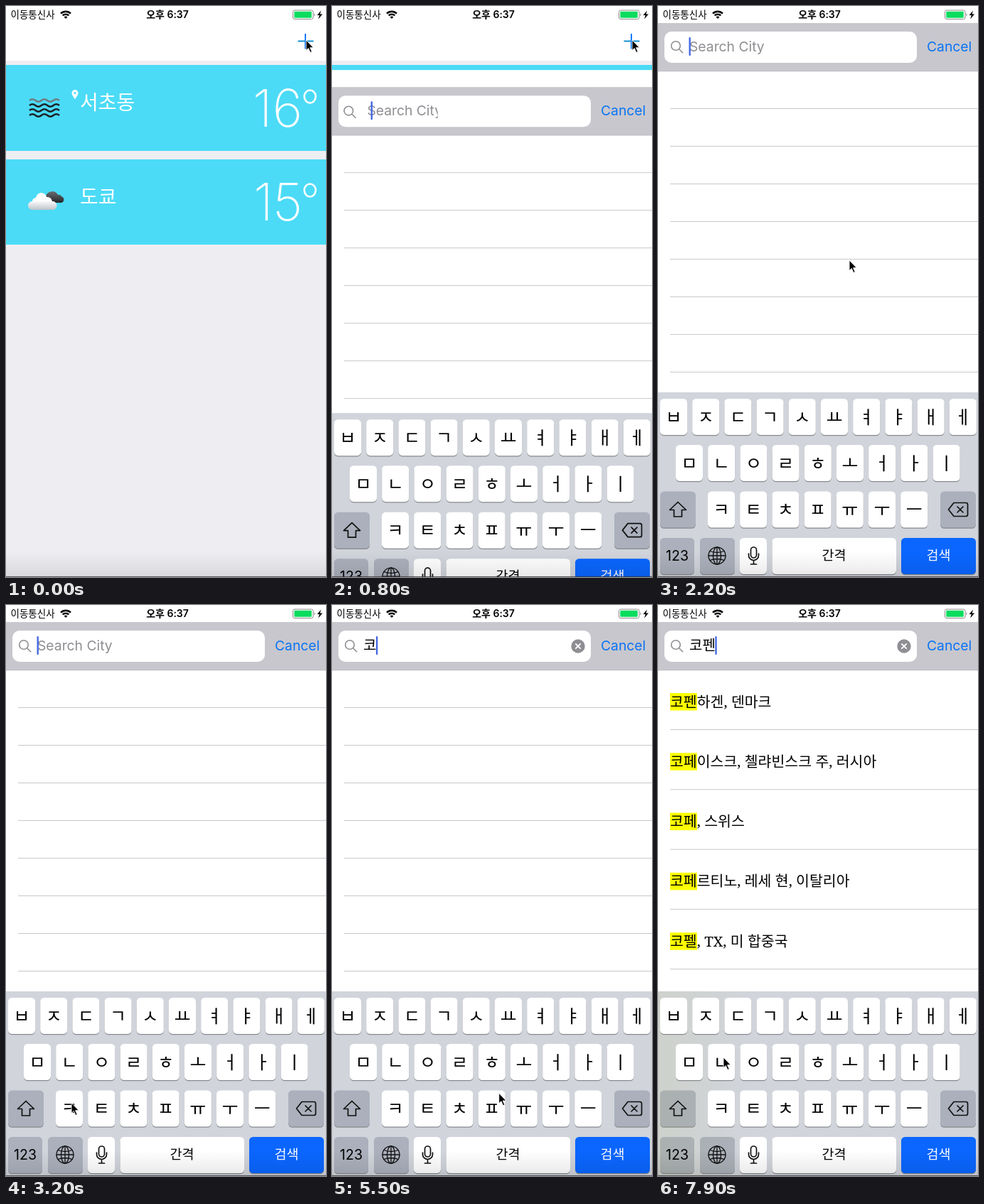
These frames come from a looping animation (450x804 px, 8000 ms). An HTML page:

```html
<!DOCTYPE html>
<html lang="ko">
<head>
<meta charset="utf-8">
<title>City search</title>
<style>
html, body { margin: 0; width: 100%; height: 100%; overflow: hidden; background: #fff; }
svg { display: block; }
#stage { width: 100vw; height: 100vh; }
text { font-family: Inter, "Noto Sans CJK KR", sans-serif; }
.place { font-size: 28px; font-weight: 300; fill: #fff; }
.temp { font-size: 73px; font-weight: 200; fill: #fff; text-anchor: end; }
.row { font: 20.5px "Noto Serif", "Noto Sans CJK KR", serif; }
.field { font-size: 20px; }
.hint { font-size: 19.3px; }
.jamo { font-size: 25px; text-anchor: middle; }
.word { font-size: 18.5px; text-anchor: middle; }
.line { fill: none; stroke: #111; stroke-width: 1.7; stroke-linejoin: round; stroke-linecap: round; }
</style>
</head>
<body>
<svg id="stage" viewBox="0 0 450 804" preserveAspectRatio="none">
  <defs>
    <linearGradient id="whiteCloud" x2="0" y2="1">
      <stop offset=".45" stop-color="#fff"/><stop offset="1" stop-color="#bfc3c9"/>
    </linearGradient>
    <linearGradient id="darkCloud" x2="0" y2="1">
      <stop stop-color="#6a6d71"/><stop offset="1" stop-color="#25272a"/>
    </linearGradient>
    <linearGradient id="tintFade">
      <stop stop-color="#a8b400" stop-opacity=".07"/><stop offset="1" stop-color="#a8b400" stop-opacity="0"/>
    </linearGradient>
    <linearGradient id="footFade" x2="0" y2="1">
      <stop stop-opacity="0"/><stop offset="1" stop-opacity=".09"/>
    </linearGradient>
  </defs>

  <g id="home">
    <rect width="450" height="804" fill="#eeedf2"/>
    <rect width="450" height="77" fill="#fff"/>
    <g id="plus" stroke-width="2">
      <path d="M410.500 49.500h22" stroke="#1390d0"/><path d="M421 39v21.500" stroke="#0a7aff"/>
    </g>
    <path d="M0 83h450v121H0zM0 216h450v120H0z" fill="#4bdbf6"/>
    <g id="fog" fill="none" stroke-width="2.600"></g>
    <path d="M97 131.500c-2-4-4.500-5.500-4.500-9a4.500 4.500 0 0 1 9 0c0 3.500-2.500 5-4.500 9z" fill="#fff"/>
    <circle cx="97" cy="122.500" r="1.600" fill="#4bdbf6"/>
    <path d="M62 277a7 7 0 0 1-6-8a9 9 0 0 1 17-3a4.500 4.500 0 0 1 5 2a4.700 4.700 0 0 1 0 9z" fill="url(#darkCloud)"/>
    <path d="M37 287a6 6 0 0 1 0-12a5 5 0 0 1 5-5a7.600 7.600 0 0 1 15-1a7 7 0 0 1 8 6a6 6 0 0 1 1 12z" fill="url(#whiteCloud)"/>
    <text class="place" x="104" y="145.700">서초동</text>
    <text class="place" x="104" y="278.500">도쿄</text>
    <text class="temp" x="417" y="170">16</text>
    <text class="temp" x="417" y="302">15</text>
    <g fill="none" stroke="#fff" stroke-width="2.600">
      <ellipse cx="427.500" cy="127.500" rx="8" ry="9"/><ellipse cx="427.500" cy="259.500" rx="8" ry="9"/>
    </g>
  </g>

  <g id="modal">
    <rect width="450" height="804" fill="#fff"/>
    <g id="blank"></g>
    <g id="results"></g>
    <rect y="24" width="450" height="68" fill="#c8c7cd"/>
    <rect y="91.500" width="450" height=".7" fill="#b4b3b9"/>
    <rect x="9" y="36" width="355" height="44" rx="10" fill="#fff"/>
    <g id="lens" fill="none" stroke="#8e8e93" stroke-width="1.600">
      <circle cx="25" cy="56" r="6.300"/><path d="M29.700 60.700l5.500 5.500"/>
    </g>
    <svg id="hintBox" y="38" height="36"><text class="hint" y="26" fill="#8e8e93">Search City</text></svg>
    <text id="query" class="field" x="44" y="64"></text>
    <g id="clear">
      <circle cx="346" cy="58" r="9.700" fill="#8e8e93"/>
      <path d="M342.300 54.300l7.400 7.400m0-7.400l-7.400 7.400" stroke="#fff" stroke-width="1.900"/>
    </g>
    <rect id="caret" y="44" width="2.400" height="26" rx="1" fill="#4369e3"/>
    <text class="hint" x="378" y="64" fill="#0a74f5">Cancel</text>
  </g>

  <g id="keyboard">
    <rect y="544" width="450" height="264" fill="#d1d4db"/>
    <g id="grayKeys"></g>
    <rect id="tint" y="544" width="135" height="260" fill="url(#tintFade)"/>
    <g id="keys"></g>
    <path class="line" d="M28 698.500l11.500 11h-6v9.500h-11v-9.500h-6z"/>
    <path class="line" d="M408.500 709l7.500-9.500h17a2.500 2.500 0 0 1 2.500 2.500v14a2.500 2.500 0 0 1-2.500 2.500h-17zM421 705l8 8m0-8l-8 8"/>
    <g class="line" style="stroke-width:1.300">
      <circle cx="83" cy="774" r="12"/><ellipse cx="83" cy="774" rx="5.500" ry="12"/>
      <path d="M71 774h24M83 762v24M73 767.500q10 4 20 0M73 780.500q10-4 20 0"/>
    </g>
    <rect class="line" x="130.500" y="762" width="8" height="15" rx="4"/>
    <path class="line" d="M127.500 771v2.500a7 7 0 0 0 14 0v-2.500M134.500 780.500v5.500M130.500 786h8"/>
    <text x="27" y="781" font-size="19.500" text-anchor="middle">123</text>
    <text class="word" x="247.500" y="780">간격</text>
    <text class="word" x="394.500" y="780" fill="#fff">검색</text>
  </g>

  <rect y="768" width="450" height="36" fill="url(#footFade)"/>
  <rect y="803" width="450" height="1" fill="#333" opacity=".75"/>

  <g id="status">
    <text x="6.500" y="17" font-size="13.500">이동통신사</text>
    <g id="wifi" fill="none" stroke="#000" stroke-width="2.500"></g>
    <text x="227" y="17" font-size="14" font-weight="600" text-anchor="middle">오후 6:37</text>
    <rect x="403.500" y="6" width="28.500" height="12.500" rx="2.500" fill="#fff" stroke="#8b8b8b"/>
    <rect x="405.300" y="7.800" width="24.500" height="9" rx="1" fill="#0bdc5f"/>
    <path d="M433.500 10q2 2.300 0 4.600z" fill="#777"/>
    <path d="M443 6.500l-5.500 6.500h3.300l-1.700 5.500 6-7h-3.500z"/>
  </g>
  <path id="pointer" d="M0 0v14.500l3.300-3 2.600 6 2.300-1-2.600-5.800h4.700z" stroke="#fff" stroke-width=".9"/>
</svg>

<script>
const $ = id => document.getElementById(id);
const LOOP = 8000, FRAME = 100, SLIDE = 568.8;

// time, x, y of the pointer tip
const path = [
  [0, 422, 48], [1050, 422, 48], [2200, 269, 358], [2350, 269, 358],
  [3200, 92, 701], [3600, 92, 701], [4100, 200, 656], [4700, 268, 637],
  [5050, 268, 637], [5700, 225, 702], [6100, 225, 702], [6500, 417, 603],
  [6750, 428, 575], [6950, 428, 575], [7800, 92, 637], [8000, 92, 637]
];
const typed = [[SLIDE, ''], [3500, 'ㅋ'], [4900, '코'], [6100, '콮'], [6700, '코페'], [7850, '코펜']];
const LIST_AT = 7000;

const cities = [
  ['코펜', '하겐, 덴마크'], ['코페', '이스크, 첼랴빈스크 주, 러시아'], ['코페', ', 스위스'],
  ['코페', '르티노, 레세 현, 이탈리아'], ['코펠', ', TX, 미 합중국']
];

const repeat = (n, draw) => Array.from({ length: n }, (_, i) => draw(i)).join('');
const rule = y => `<rect x="17" y="${y}" width="433" height="1" fill="#c8c7cc"/>`;

function key(x, y, w, fill, label = '') {
  return `<rect x="${x}" y="${y + 1.3}" width="${w}" height="51" rx="5.5" fill="#888a8f"/>
    <rect x="${x}" y="${y}" width="${w}" height="51" rx="5.5" fill="${fill}"/>
    <text class="jamo" x="${x + w / 2}" y="${y + 34.5}">${label}</text>`;
}

function build() {
  $('fog').innerHTML = repeat(4, i =>
    `<path d="M33 ${133 + i * 7}q4.200-3.500 8.400 0t8.400 0 8.400 0 8.400 0 8.400 0" stroke="${i ? '#1c2226' : '#747b80'}"/>`);
  $('wifi').innerHTML = [9.8, 6, 2].map(r => {
    const d = r * 0.71;
    return `<path d="M${84 - d} ${17.7 - d}A${r} ${r} 0 0 1 ${84 + d} ${17.7 - d}"/>`;
  }).join('') + '<path d="M84 18l-2-2.500h4z" fill="#000" stroke="none"/>';
  $('blank').innerHTML = repeat(8, i => rule(144 + 53 * i));
  $('results').innerHTML = cities.map(([hit, rest], i) => {
    const y = 84.3 * i;
    return `<rect x="17" y="${124 + y}" width="38" height="24.500" fill="#fbff00"/>
      <text class="row" x="17" y="${143.5 + y}">${hit}${rest}</text>${rule(175 + y)}`;
  }).join('');

  const gray = '#abb0bc';
  $('grayKeys').innerHTML = key(3, 683.5, 50, gray) + key(397, 683.5, 50, gray) +
    key(3, 749, 48, gray) + key(59, 749, 49, gray);
  const rows = [[3, 553, 'ㅂㅈㄷㄱㅅㅛㅕㅑㅐㅔ'], [25, 618, 'ㅁㄴㅇㄹㅎㅗㅓㅏㅣ'], [70, 683.5, 'ㅋㅌㅊㅍㅠㅜㅡ']];
  $('keys').innerHTML = rows.map(([x, y, letters]) =>
    [...letters].map((c, i) => key(x + 45.2 * i, y, 38, '#fff', c)).join('')).join('') +
    key(115, 749, 38, '#fff') + key(160.5, 749, 174.5, '#fff') + key(342, 749, 105, '#0a66ff');
}

function pointerAt(t) {
  const i = Math.max(1, path.findIndex(p => p[0] > t));
  const [a, b] = [path[i - 1], path[i]];
  const u = (t - a[0]) / (b[0] - a[0]), e = u * u * (3 - 2 * u);
  return [a[1] + (b[1] - a[1]) * e, a[2] + (b[2] - a[2]) * e];
}

// Distance left of a critically damped spring, 1 to 0
function slideLeft(t) {
  const s = Math.max(0, t - SLIDE) * 0.0162;
  return t > 1500 ? 0 : (1 + s) * Math.exp(-s);
}

const move = (id, x, y) => $(id).setAttribute('transform', `translate(${x} ${y})`);
const show = (id, on) => $(id).setAttribute('visibility', on ? 'visible' : 'hidden');

function draw(t) {
  const left = slideLeft(t);
  move('modal', 0, 804 * left);
  move('keyboard', 0, 260 * left);
  move('lens', -15 * left, 13 * left);
  move('pointer', ...pointerAt(t));
  $('plus').setAttribute('opacity', t < 100 ? 1 : Math.min(1, 0.3 + Math.max(0, t - 300) / 400));

  const [since, text] = typed.filter(k => k[0] <= t).pop() || typed[0];
  $('query').textContent = text;
  $('hintBox').setAttribute('x', 44 + 48 * left);
  $('hintBox').setAttribute('width', 110 - 94 * left);
  $('caret').setAttribute('x', 43.5 + 99 * left + 18.4 * text.length);
  show('caret', Math.max(0, t - since) % 1000 < 700);
  show('hintBox', !text);
  show('clear', text);

  const found = t >= LIST_AT;
  show('results', found);
  show('tint', found);
  show('blank', !found);
}

function tick() {
  draw(Math.floor(performance.now() % LOOP / FRAME) * FRAME);
  requestAnimationFrame(tick);
}

build();
tick();
</script>
</body>
</html>
```
